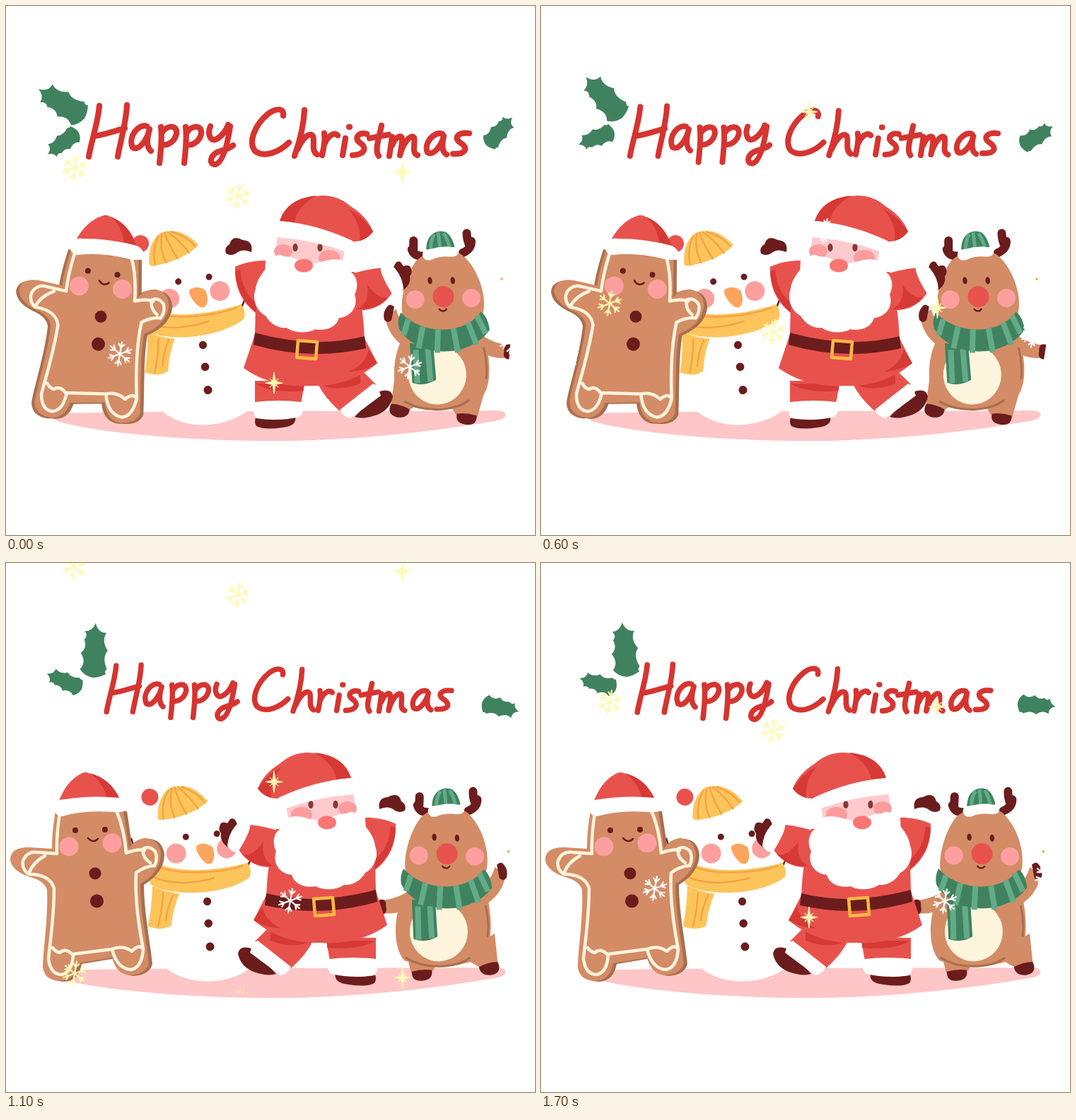
An HTML page that plays this animation: 748x748 px, repeating every 1.8 s.

```html
<!DOCTYPE html>
<html lang="en">
<head>
<meta charset="utf-8">
<title>Happy Christmas</title>
<style>
  html, body { margin: 0; width: 100%; height: 100%; overflow: hidden; background: #fff; }
  svg { display: block; width: 100vw; height: 100vh; }
  .red { fill: #e8524d; }
  .deep { fill: #d73935; }
  .dark { fill: #6b1c1c; }
  .white { fill: #fff; }
  .skin { fill: #d38c66; }
  .shade { fill: #a86f4e; }
  .blush { fill: #fd9f9f; }
  .gold { fill: #fdc45b; }
  .green { fill: #40825f; }
  .cream { fill: #fff5dc; }
  .line { fill: none; stroke-linecap: round; stroke-linejoin: round; }
  .ink { stroke: #6b1c1c; stroke-width: 2.5; }
  .icing { stroke: #fff3dc; stroke-width: 4.5; }
  .weave { stroke: #f3a343; stroke-width: 2.4; }
  .knit { stroke: #63ab88; stroke-width: 8; stroke-linecap: butt; }
  .fold { stroke: #a86f4e; stroke-width: 3; }
  #title { stroke: #d63430; stroke-width: 8.2; }
</style>
</head>
<body>
<svg viewBox="0 0 748 748">
  <defs>
    <path id="leaf" d="M0-77Q4-63 16-64Q9-52 19-39Q11-29 19-13Q15-9 18-6Q8 0-1 0Q-13-2-19-11Q-10-21-19-34Q-10-41-15-53Q-9-59-15-65Q-4-65 0-77Z"/>
    <path id="cookie" d="M70 350C66 375 65 390 65 404L32 402Q6 402 6 420Q9 436 34 444Q54 449 58 462C60 500 52 550 52 572Q55 591 78 591Q98 589 102 566L150 558Q156 582 176 583Q198 581 202 566C198 530 190 490 190 454Q219 436 219 411Q216 389 195 389Q180 392 174 404L166 350Z"/>
    <g id="limbs">
      <path class="skin" d="M570 462Q553 470 536 470L534 488Q552 492 566 486Z"/>
      <path class="dark" d="M531 469Q542 467 540 479Q541 491 532 490Z"/>
      <path class="skin" d="M672 462Q690 458 698 436L712 450Q705 474 684 486Z"/>
      <path class="dark" d="M701 433Q708 428 711 434Q717 442 713 453Q707 458 703 452Z"/>
      <path class="skin" d="M560 530L568 576H598L616 552Z"/>
      <path class="dark" d="M569 574Q583 571 597 574Q599 588 582 588Q567 588 569 574Z"/>
      <path class="skin" d="M636 556L664 575L691 570L690 530Z"/>
      <path class="dark" d="M664 575Q678 569 691 570Q697 586 680 588Q665 588 664 575Z"/>
    </g>
    <g id="flake" class="line" stroke-width="2.2"></g>
    <path id="star" d="M0-15L1.8-1.8L12 0L1.8 1.8L0 15L-1.8 1.8L-12 0L-1.8-1.8ZM-6-6L6 6M6-6L-6 6" stroke-width="1.3"/>
    <clipPath id="sky"><path d="M0 0H748V608H0Z"/></clipPath>
  </defs>

  <path fill="#fec6c6" d="M75 576C200 572 600 573 697 572Q708 573 706 580Q704 585 690 587C600 603 480 615 380 615C250 615 130 603 75 588Q62 583 75 576Z"/>

  <g class="green">
    <g class="holly" data-pivot="114,170"><use href="#leaf" transform="translate(123 162) rotate(3)"/></g>
    <g class="holly" data-pivot="104,182"><use href="#leaf" transform="translate(107 178) rotate(-66) scale(.7)"/></g>
    <g class="holly" data-pivot="676,192"><use href="#leaf" transform="translate(673 198) rotate(103) scale(.7)"/></g>
  </g>

  <g id="title" class="line" role="img" aria-label="Happy Christmas">
    <path d="M132 141C130 165 121 190 117 213M171 140C170 165 162 190 158 213M124 184C140 182 155 176 168 173"/>
    <path d="M199 170C188 166 172 184 179 200C188 206 200 188 203 174C199 188 199 200 205 205"/>
    <path id="p" d="M219 171C221 185 219 205 217 222M220 180C228 167 243 168 241 181C238 193 227 198 221 196"/>
    <use href="#p" x="35"/>
    <path d="M289 170C284 182 290 193 298 188C306 184 312 174 314 168M317 170C314 190 308 221 296 224C287 224 288 213 298 207C306 203 315 203 321 197"/>
    <path d="M392 155C394 144 381 144 370 153C352 168 342 192 352 205C365 215 386 207 400 193"/>
    <path d="M422 147C421 170 414 195 408 212M412 203C420 185 430 178 434 184C437 191 431 205 440 210"/>
    <path d="M450 180C452 190 449 202 447 211M450 196C455 184 464 177 469 183"/>
    <path d="M480 187L476 211M485 171L486 171"/>
    <path d="M510 181C500 178 491 186 500 193C511 200 508 210 490 211"/>
    <path d="M531 169C527 188 521 205 527 212M514 187L541 182"/>
    <path d="M546 185L542 212M546 197C551 184 561 180 560 190C560 198 558 205 557 211C561 195 572 180 577 186C579 195 573 208 582 211"/>
    <path d="M617 181C606 176 590 194 596 207C604 213 616 197 619 184C616 197 616 206 623 210"/>
    <path d="M655 180C640 178 632 186 642 193C655 201 650 210 632 209"/>
  </g>

  <g id="deerLimbs"><use href="#limbs"/></g>
  <g id="deer">
    <path class="skin" d="M575 460C553 485 548 540 566 560Q615 580 668 563Q695 550 689 490Q688 470 680 455Z"/>
    <path class="line fold" d="M568 556Q590 571 622 570Q645 569 658 560M684 488Q688 510 685 530"/>
    <ellipse class="cream" cx="616" cy="521" rx="41" ry="42"/>
    <g id="deerHead">
      <path class="line" stroke="#6b1c1c" stroke-width="12" d="M611 351Q600 350 598 340M600 344L602 328M669 354Q682 350 683 339M680 346Q677 336 678 327"/>
      <path class="skin" d="M602 357C580 380 566 428 577 444C598 467 664 467 685 446C696 425 690 381 668 357C652 343 620 343 602 357Z"/>
      <path class="green" d="M618 347Q619 328 630 322Q639 317 649 322Q658 330 659 348Z"/>
      <path class="line knit" style="stroke-width:5" d="M624 346Q626 330 632 323M638 347V321M652 347Q650 330 645 323"/>
      <path class="white" d="M612 351Q612 342 624 343Q640 340 655 344Q665 344 663 354Q660 359 650 357Q636 354 624 358Q614 360 612 351Z"/>
      <g class="dark">
        <ellipse cx="618" cy="387" rx="3.2" ry="5"/>
        <ellipse cx="650" cy="391" rx="3.2" ry="5"/>
      </g>
      <g class="blush"><circle cx="594" cy="411" r="13"/><circle cx="673" cy="419" r="13"/></g>
      <circle class="red" cx="634" cy="412" r="15"/>
      <path class="line ink" d="M626 429Q631 435 636 430"/>
    </g>
    <path class="green" d="M580 474L613 480L614 528Q597 537 580 530Z"/>
    <path class="line knit" d="M588 484L587 531M605 484L606 530"/>
    <path class="green" d="M570 430Q564 440 566 452C588 496 662 502 694 462Q692 442 683 436C660 466 600 466 570 430Z"/>
    <path class="line knit" d="M580 440L572 462M600 452L592 482M621 457L618 490M643 457L647 491M664 450L674 482M677 441L688 467"/>
  </g>
  <circle id="spark" r="1.9" fill="#efb64d"/>

  <g id="snowman">
    <path class="line ink" d="M199 379L202 392L226 432M354 442L367 420"/>
    <ellipse class="white" cx="297" cy="529" rx="84" ry="62"/>
    <ellipse class="white" cx="296" cy="388" rx="68" ry="52"/>
    <circle class="red" cx="231" cy="323" r="12"/>
    <path class="gold" d="M239 352Q242 322 262 312Q291 307 312 337Q290 355 246 357Q238 357 239 352Z"/>
    <path class="line weave" d="M258 316Q246 333 247 355M263 314Q256 335 263 355M267 313Q271 333 280 352M272 313Q287 327 297 346M277 313Q297 322 307 338"/>
    <g class="dark">
      <circle cx="276" cy="384" r="4.5"/><circle cx="320" cy="384" r="4.5"/>
      <circle cx="297" cy="478" r="5.6"/><circle cx="295.5" cy="509" r="5.8"/><circle cx="294.5" cy="542" r="6"/>
    </g>
    <g class="blush"><circle cx="260" cy="406" r="14"/><circle cx="332" cy="406" r="14"/></g>
    <path fill="#fda55c" d="M290 398Q300 392 312 402Q316 418 308 425Q300 428 292 412Q287 402 290 398Z"/>
    <path class="gold" d="M222 448Q243 460 259 463Q247 485 243 507Q227 514 210 504Q218 480 222 448Z"/>
    <path class="line weave" d="M236 460Q232 485 224 506M250 464Q240 480 236 499"/>
    <path class="gold" d="M230 416C260 436 320 436 359 429Q365 440 360 450C322 472 250 467 221 447Q213 436 230 416Z"/>
    <path class="line weave" d="M229 419C255 438 320 440 352 433M221 434C250 452 285 450 310 446"/>
  </g>

  <g id="ginger">
    <use id="rim" class="shade" href="#cookie" x="-4" y="2"/>
    <use class="shade" href="#cookie" x="5" y="1"/>
    <use class="skin" href="#cookie"/>
    <path class="line icing" d="M76 354Q71 385 72 411M156 350Q167 375 170 410Q186 404 196 406M72 411L44 409Q30 407 24 421Q22 433 32 440Q37 424 55 414M32 440Q62 440 68 460C68 500 63 530 60 560Q63 582 79 582Q93 579 95 555Q85 543 76 551Q69 549 66 544M95 553L150 546Q157 574 177 575Q192 572 194 546Q188 538 178 549Q165 540 150 546M194 546C187 510 182 470 184 438Q198 428 210 428Q215 418 211 408Q203 399 194 404Q192 416 204 424"/>
    <g class="blush"><circle cx="89" cy="401" r="13.5"/><circle cx="150" cy="396" r="13.5"/></g>
    <g class="dark">
      <circle cx="98" cy="378" r="4"/><circle cx="140" cy="377" r="4"/>
      <circle cx="126" cy="439" r="8.5"/><circle cx="128.5" cy="478" r="9.5"/>
    </g>
    <path class="line ink" d="M116 389Q123 397 130 390"/>
    <path class="red" d="M75 336Q86 308 106 298Q112 294 119 298Q147 304 161 334Z"/>
    <path class="deep" d="M118 297Q147 304 161 334H143Q138 310 118 297Z"/>
    <path class="white" d="M68 347Q69 334 84 334Q120 328 160 332Q174 336 172 347Q168 354 150 352Q110 349 80 358Q69 358 68 347Z"/>
  </g>

  <g id="santa">
    <path class="red" d="M372 515L434 534Q426 552 403 573L352 535Z"/>
    <path class="red" d="M452 530H523V562H458Z"/>
    <path class="deep" d="M374 520L433 534Q408 547 374 534ZM454 534H522Q500 548 454 544Z"/>
    <path class="dark" d="M349 546Q331 539 328 552Q331 570 350 578Q370 585 382 581Z"/>
    <path class="white" d="M356 534L403 571Q398 581 388 583L345 551Q349 536 356 534Z"/>
    <path class="dark" d="M466 580Q463 594 484 596Q510 600 521 594Q525 588 521 580Z"/>
    <path class="white" d="M457 560Q490 556 523 560Q528 575 521 583Q490 588 460 581Q452 575 457 560Z"/>
    <path class="red" d="M382 376Q370 420 368 470L350 505Q390 539 446 537Q500 540 539 512L523 464L521 380Z"/>
    <path class="deep" d="M350 505L362 486Q368 508 390 517Q368 516 350 505Z"/>
    <path class="red" d="M343 370Q365 372 386 379L381 430Q346 433 328 404Z"/>
    <path class="deep" d="M334 412Q348 416 364 394Q360 420 379 429Q350 430 334 412Z"/>
    <path class="red" d="M508 360Q538 358 551 368Q553 410 522 434L510 400Z"/>
    <path class="deep" d="M551 375Q549 410 522 433L521 420Q541 405 544 372Z"/>
    <path class="white" d="M512 357Q530 345 554 352Q562 358 552 369Q535 361 514 360Z"/>
    <path class="dark" d="M528 348Q525 332 540 331Q555 323 559 337Q567 341 564 350Q557 354 550 350Q541 342 528 348Z"/>
    <path class="dark" d="M327 370Q324 359 317 362L313 368Q303 364 302 373Q300 377 304 382Q302 394 314 402L322 396Z"/>
    <path class="white" d="M325 371Q334 362 345 368Q348 376 329 407Q322 413 313 400Q314 384 325 371Z"/>
    <path class="dark" d="M368 467Q440 485 523 462L525 479Q445 502 366 484Z"/>
    <path fill="none" stroke="#fcb942" stroke-width="4.5" stroke-linejoin="round" d="M435 475L462 473L464 497L437 499Z"/>
    <path fill="#fecacd" d="M396 344Q440 328 491 326Q495 345 494 360L402 378Z"/>
    <g fill="#fb9c9d"><ellipse cx="418" cy="356" rx="15" ry="11"/><ellipse cx="483" cy="347" rx="13" ry="10"/></g>
    <path class="white" d="M392 364C410 352 424 362 441 364C456 364 466 354 482 354Q493 348 495 358C506 370 520 383 522 400C528 415 520 432 508 438C500 452 487 456 478 455C465 464 445 462 438 457C424 460 408 455 404 441C388 440 376 425 382 408C375 394 380 380 388 376Q386 368 392 364Z"/>
    <g fill="#873a34"><ellipse cx="431" cy="341.5" rx="3.6" ry="5.8"/><ellipse cx="466" cy="341.5" rx="3.6" ry="5.8"/></g>
    <ellipse cx="454" cy="367" rx="13" ry="9.5" fill="#fb7673"/>
    <path class="red" d="M356 319Q364 298 388 283Q405 268 428 268Q477 271 488 304Q440 309 385 333Q368 334 356 319Z"/>
    <path class="deep" d="M356 319Q368 299 391 287Q372 308 375 332Q363 329 356 319ZM436 268Q478 272 488 304L467 306Q464 284 436 268Z"/>
    <path class="white" d="M385 332Q436 308 488 304Q496 316 491 327Q440 331 396 347Q383 350 385 332Z"/>
  </g>

  <g id="snow" clip-path="url(#sky)"></g>
</svg>
<script>
  const NS = 'http://www.w3.org/2000/svg';
  const LOOP = 1800, STEP = 100, TILE = 575;
  const $ = id => document.getElementById(id);
  const move = (el, value) => el.setAttribute('transform', value);

  function add(parent, tag, attrs) {
    const el = document.createElementNS(NS, tag);
    for (const key in attrs) el.setAttribute(key, attrs[key]);
    return parent.appendChild(el);
  }

  for (let a = 10; a < 360; a += 60) {
    add($('flake'), 'path', { d: 'M0 0V-17M-4-14L0-9L4-14', transform: `rotate(${a})` });
  }

  const YELLOW = '#fff9b4', WHITE = '#fff';
  const flakes = [
    ['flake', YELLOW, 97, 229], ['flake', YELLOW, 328, 269],
    ['star', YELLOW, 560.5, 235], ['star', YELLOW, 379, 533],
    ['flake', WHITE, 161, 492], ['flake', WHITE, 402, 126],
    ['flake', WHITE, 571, 510], ['flake', WHITE, 696, 274],
    ['flake', WHITE, 715, 475], ['flake', WHITE, 36, 304]
  ].map(([shape, color, x, y]) => {
    const el = add($('snow'), 'g', { fill: color, stroke: color });
    // neighbouring copies cover the wrap at both edges
    for (const dy of [-TILE, 0, TILE]) add(el, 'use', { href: '#' + shape, y: dy });
    return { el, x, y };
  });

  const holly = [...document.querySelectorAll('.holly')];
  const tri = (t, period) => 1 - Math.abs(1 - 2 * (t % period) / period);

  function draw(now) {
    const t = Math.floor(now % LOOP / STEP) * STEP;
    const sway = tri(t, 600), back = sway - 1;
    const flipped = t % 600 < 300;

    move($('title'), `translate(386 185) scale(${1 - 0.099 * tri(t, 720)}) translate(-386 -185)`);
    const turn = 73 * tri(t + 20, 720) - 65;
    for (const el of holly) move(el, `rotate(${turn},${el.dataset.pivot})`);

    move($('snowman'), `rotate(${8.6 * back},297,602)`);
    move($('deer'), `rotate(${3.6 * back},620,620)`);
    move($('deerHead'), `rotate(${3.6 * back},622,450)`);
    move($('spark'), `translate(${701 + 28 * sway} ${386 + 66 * sway})`);
    move($('deerLimbs'), flipped
      ? `rotate(${6 + 3 * sway},618,515) translate(1241 0) scale(-1 1)`
      : `rotate(${7 * back},618,515)`);

    move($('santa'), flipped ? 'translate(875 0) scale(-1 1)' : '');
    move($('ginger'), flipped ? 'translate(2 0) rotate(8.9,128,478)' : '');
    $('rim').style.display = flipped ? '' : 'none';

    for (const { el, x, y } of flakes) {
      move(el, `translate(${x} ${(y + TILE * t / LOOP) % TILE})`);
    }
  }

  (function frame() {
    draw(performance.now());
    requestAnimationFrame(frame);
  })();
</script>
</body>
</html>
```
